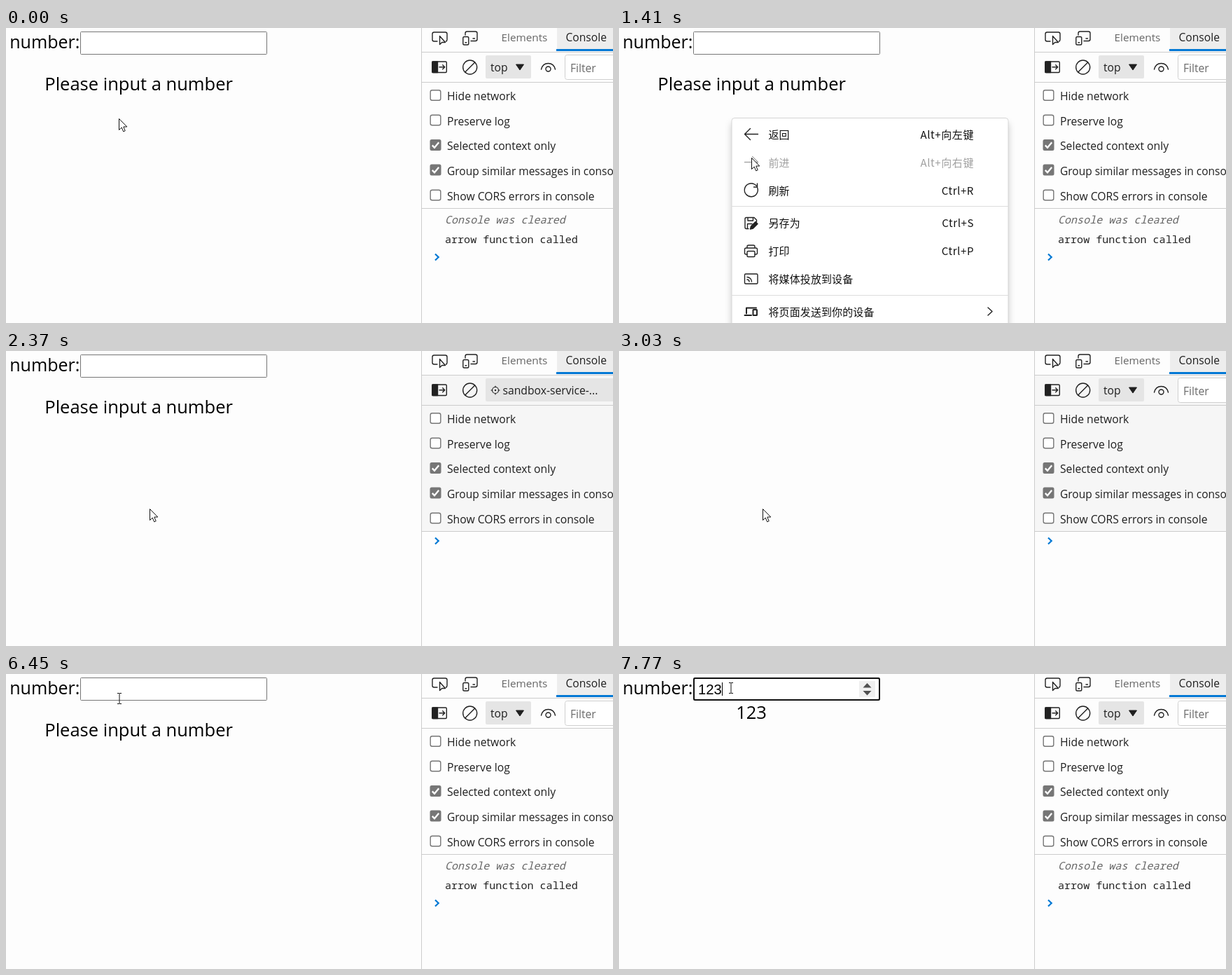
An HTML page that plays this animation: 867x421 px, repeating every 8 s.

```html
<!DOCTYPE html>
<html lang="zh-CN">
<head>
<meta charset="utf-8">
<title>Number input demo</title>
<style>
html, body { margin: 0; width: 100%; height: 100%; overflow: hidden; background: #fdfdfd; }
svg { display: block; width: 867px; height: 421px; }
text { font-family: "Open Sans", "Noto Sans", sans-serif; white-space: pre; }
.page text { font-size: 25.5px; fill: #000; }
.tools text { font-size: 15.7px; fill: #1f1f1f; }
.tools .log { font: 15.07px "Noto Sans Mono", "DejaVu Sans Mono", monospace; fill: #222; }
.tools .note { font-style: italic; fill: #666; }
.page .typed { font: 20.2px "Liberation Sans", Arial, sans-serif; }
.menu text { font: 15px "Noto Sans CJK SC", "Noto Sans CJK JP", sans-serif; letter-spacing: .1px; fill: #111; }
.menu .key { text-anchor: end; letter-spacing: .6px; }
.menu .off { fill: #a0a0a0; }
.mid { text-anchor: middle; }
.line { fill: none; stroke: #222; stroke-width: 1.4; stroke-linecap: round; stroke-linejoin: round; }
.box { fill: #fff; stroke: #767676; stroke-width: 1.4; }
.sheet { fill: #fff; stroke: #d6d6d6; stroke-width: 1; filter: drop-shadow(0 7px 5px rgba(0,0,0,.2)); }
.hover { fill: #ededed; }

/* every change is a hard cut on an 8 s clock */
.a { animation: 8s step-end infinite; }
.menu { animation-name: menu; }
.back { animation-name: back; }
.reload { animation-name: reload; }
.form { animation-name: form; }
.message { animation-name: message; }
.panel { animation-name: panel; }
.top { animation-name: top; }
.sandbox { animation-name: sandbox; }
.cleared { animation-name: cleared; }
.called { animation-name: called; }
.rule { animation-name: rule; }
.prompt { animation-name: prompt; }
.arrow { animation-name: arrow; }
.beam { animation-name: beam; }
.spin { animation-name: spin; }
.focus { animation-name: focus; }
.caret { animation-name: caret; }
.one { animation-name: one; }
.two { animation-name: two; }
.three { animation-name: three; }
.only1 { animation-name: only1; }
.only2 { animation-name: only2; }

@keyframes menu { 0%, 24.25%, 100% { opacity: 0 } 12.5%, 22.625% { opacity: .5 } 14% { opacity: 1 } }
@keyframes back { 0%, 17.625%, 100% { opacity: 0 } 14% { opacity: 1 } }
@keyframes reload { 0%, 24.25%, 100% { opacity: 0 } 19.125% { opacity: 1 } }
@keyframes form { 0%, 74.125%, 100% { opacity: 1 } 37.875% { opacity: 0 } }
@keyframes message { 0%, 74.125% { opacity: 1 } 37.875%, 88.875%, 100% { opacity: 0 } }
@keyframes panel { 0%, 74.125%, 100% { fill: #fdfdfd } 29.625% { fill: #f6f6f6 } }
@keyframes top { 0%, 31.125%, 100% { opacity: 1 } 29.625% { opacity: 0 } }
@keyframes sandbox { 0%, 31.125%, 100% { opacity: 0 } 29.625% { opacity: 1 } }
@keyframes cleared { 0%, 67.25%, 100% { opacity: 1 } 29.625% { opacity: 0 } }
@keyframes called { 0%, 74.125%, 100% { opacity: 1 } 29.625% { opacity: 0 } }
@keyframes rule { 0%, 74.125%, 100% { opacity: 0 } 67.25% { opacity: 1 } }
@keyframes prompt {
  0%, 74.125%, 100% { transform: translateY(327px) }
  29.625% { transform: translateY(271px) }
  67.25% { transform: translateY(299px) }
}
@keyframes arrow {
  0% { transform: translate(161px, 129px); opacity: 1 }
  14% { transform: translate(173px, 149px); opacity: 1 }
  15.875% { transform: translate(178px, 158px); opacity: 1 }
  17.625% { transform: translate(189px, 185px); opacity: 1 }
  19.125% { transform: translate(199px, 213px); opacity: 1 }
  20.75% { transform: translate(205px, 225px); opacity: 1 }
  77.375% { transform: translate(183px, 135px); opacity: 1 }
  78.875% { transform: translate(178px, 97px); opacity: 1 }
  80.625%, 100% { transform: translate(178px, 97px); opacity: 0 }
}
@keyframes beam {
  0% { transform: translate(162px, 35px); opacity: 0 }
  80.625% { transform: translate(162px, 35px); opacity: 1 }
  82.25%, 100% { transform: translate(160px, 20px); opacity: 1 }
}
@keyframes spin { 0% { opacity: 0 } 82.25%, 100% { opacity: 1 } }
@keyframes focus { 0% { opacity: 0 } 83.875%, 100% { opacity: 1 } }
@keyframes caret {
  0%, 83.875% { transform: translateX(113px) }
  88.875% { transform: translateX(125px) }
  94% { transform: translateX(136px) }
  97.125%, 100% { transform: translateX(147px) }
}
@keyframes one { 0% { opacity: 0 } 88.875%, 100% { opacity: 1 } }
@keyframes two { 0% { opacity: 0 } 94%, 100% { opacity: 1 } }
@keyframes three { 0% { opacity: 0 } 97.125%, 100% { opacity: 1 } }
@keyframes only1 { 0%, 94%, 100% { opacity: 0 } 88.875% { opacity: 1 } }
@keyframes only2 { 0%, 97.125%, 100% { opacity: 0 } 94% { opacity: 1 } }
</style>
</head>
<body>
<svg viewBox="0 0 867 421">
  <defs>
    <rect id="box" class="box" x="606.2" y="-7.3" width="14.6" height="14.6" rx="2.5"/>
    <g id="checked">
      <rect x="605.5" y="-8" width="16" height="16" rx="2.5" fill="#767676"/>
      <path d="M608.8 .4l3.2 3.4 6.2-7.6" fill="none" stroke="#fff" stroke-width="2.3"/>
    </g>
  </defs>

  <g class="page">
    <g class="a form">
      <text x="5.2" y="29" style="font-size:25px">number:</text>
      <rect x="106.5" y="5.5" width="266" height="32" rx="1" fill="#fff" stroke="#767676"/>
    </g>
    <text class="a message mid" x="189.6" y="89">Please input a number</text>
    <g class="a spin">
      <rect x="343" y="10" width="23" height="23" fill="#efefef"/>
      <path d="M348.5 19.5h12l-6-6.5zM348.5 24h12l-6 6.5z" fill="#505050"/>
    </g>
    <g class="a focus">
      <rect x="107" y="6" width="265" height="31" rx="2" fill="none" stroke="#101010" stroke-width="2"/>
      <path class="a caret" d="M.5 12v19" stroke="#000"/>
    </g>
    <text class="typed a one" x="113" y="28.5">1</text>
    <text class="typed a two" x="124.2" y="28.5">2</text>
    <text class="typed a three" x="135.5" y="28.5">3</text>
    <text class="mid a only1" x="189" y="64">1</text>
    <text class="mid a only2" x="189" y="64">12</text>
    <text class="mid a three" x="189" y="64">123</text>
  </g>

  <g class="tools">
    <rect x="787" width="80" height="31" fill="#ededed"/>
    <rect class="a panel" x="594" y="35" width="273" height="222"/>
    <path d="M593.5 0v421M594 34.5h273M594 77.5h273M594 257.5h273" stroke="#ccc"/>
    <rect x="786" y="30" width="81" height="3" fill="#0078d4"/>
    <text x="707.5" y="19" style="font-size:15.3px;fill:#666">Elements</text>
    <text x="799.5" y="19" style="font-size:15.6px">Console</text>

    <!-- inspect, device, sidebar and clear buttons -->
    <g class="line">
      <path d="M616 19h-4.5q-2.5 0-2.5-2.5v-8q0-2.5 2.5-2.5h16q2.5 0 2.5 2.5v8q0 2-1.5 2.5"/>
      <path d="M619.5 11.5v12l3.2-3h4.8z"/>
      <path d="M656 10v-2.5q0-2.5 2.5-2.5h12q2.5 0 2.5 2.5v8.5q0 2.5-2.5 2.5h-6.5M667 15h2.5"/>
      <rect x="652.8" y="12.5" width="8" height="11.5" rx="1.8"/>
      <path d="M656 20.7h1.7"/>
      <rect x="608.8" y="48" width="20.5" height="15.5" rx="1.5"/>
      <path d="M609 48h7.5v15.5h-7.5z" fill="#222"/>
      <path d="M619 55.7h7.5M623.7 52.7l3 3-3 3"/>
      <circle cx="662.7" cy="56" r="10"/>
      <path d="M655.7 63l14-14"/>
    </g>

    <g class="a top">
      <rect x="685" y="39" width="65" height="33" rx="2" fill="#e5e5e5"/>
      <text x="692" y="61.5">top</text>
      <path d="M728.5 52h11l-5.500 8z" fill="#1f1f1f" stroke="#1f1f1f" stroke-linejoin="round"/>
      <g class="line">
        <path d="M764.5 59q2-8.5 10-8.5t10 8.5"/>
        <circle cx="774.5" cy="58.5" r="3.5"/>
      </g>
      <rect x="798.5" y="38.5" width="80" height="35" rx="3" fill="#fff" stroke="#d0d0d0"/>
      <text x="806" y="62.5" style="fill:#6b6b6b">Filter</text>
    </g>
    <g class="a sandbox">
      <rect x="685" y="39" width="190" height="33" rx="2" fill="#e5e5e5"/>
      <g class="line" style="stroke-width:1.2">
        <circle cx="699" cy="56" r="4.5"/>
        <path d="M699 50v1.5M699 60.5v1.5M693 56h1.5M703.5 56h1.5"/>
      </g>
      <circle cx="699" cy="56" r="1.2" fill="#222"/>
      <text x="709.5" y="61.5">sandbox-service-...</text>
    </g>

    <use href="#box" y="96"/>
    <use href="#box" y="131.5"/>
    <use href="#checked" y="167"/>
    <use href="#checked" y="202.5"/>
    <use href="#box" y="238.5"/>
    <text x="630" y="102.5">Hide network</text>
    <text x="630" y="138.5">Preserve log</text>
    <text x="630" y="174">Selected context only</text>
    <text x="630" y="209.5" style="font-size:15.5px">Group similar messages in console</text>
    <text x="630" y="245.5">Show CORS errors in console</text>

    <text class="log note a cleared" x="627" y="279">Console was cleared</text>
    <text class="log a called" x="627" y="307">arrow function called</text>
    <path class="a rule" d="M594 285.5h273" stroke="#ececec"/>
    <path class="a prompt" d="M613 -4.5l4.7 4.5-4.7 4.5" fill="none" stroke="#0078d4" stroke-width="2.2"/>
  </g>

  <g class="a menu">
    <rect class="sheet" x="161" y="128.5" width="395" height="320" rx="4"/>
    <rect class="hover a back" x="167" y="135" width="384" height="34" rx="3"/>
    <rect class="hover a reload" x="167" y="215" width="384" height="34" rx="3"/>
    <path d="M161 254.5h395M161 381.5h395" stroke="#dcdcdc"/>
    <g class="line">
      <path d="M179.5 151.5h19M187.5 143.5l-8 8 8 8"/>
      <path d="M179.5 191.5h19M190.5 183.5l8 8-8 8" stroke="#a8a8a8"/>
      <path d="M197.5 227.5a9.5 9.5 0 1 1-4-4.5l3.5 2.5M197.5 222v5h-5"/>
      <path d="M185 286.5h-3q-2 0-2-2v-12q0-2 2-2h11l3.5 3.5v2.5M184 270.5v4.5h7.500v-4.5M183.5 286v-6.5h6.5"/>
      <path d="M187.5 287l1-4 6.5-6.5 3 3-6.5 6.5z" fill="#222"/>
      <path d="M183 314v-2q0-2 2-2h7q2 0 2 2v2M183 323h-1.5q-2 0-2-2v-5q0-2 2-2h14q2 0 2 2v5q0 2-2 2h-1.5"/>
      <rect x="183" y="318.5" width="11" height="8" rx="1.5"/>
      <rect x="179.5" y="351" width="18.5" height="14" rx="1.5"/>
      <path d="M183 355.500a6.500 6.500 0 0 1 6.500 6.500M183 359a3 3 0 0 1 3 3"/>
      <g style="stroke-width:2">
        <path d="M182 407.500v-8h14M179.5 410h9.5"/>
        <rect x="191.5" y="402" width="5.500" height="8" rx=".5"/>
      </g>
      <path d="M527 399l6 5.500-6 5.500"/>
    </g>
    <text x="213.5" y="158">返回</text><text class="key" x="507" y="158">Alt+向左键</text>
    <text class="off" x="213.5" y="198">前进</text><text class="key off" x="507" y="198">Alt+向右键</text>
    <text x="213.5" y="238">刷新</text><text class="key" x="507" y="238">Ctrl+R</text>
    <text x="213.5" y="284">另存为</text><text class="key" x="507" y="284">Ctrl+S</text>
    <text x="213.5" y="324">打印</text><text class="key" x="507" y="324">Ctrl+P</text>
    <text x="213.5" y="364">将媒体投放到设备</text>
    <text x="213.5" y="410.5">将页面发送到你的设备</text>
  </g>

  <path class="a arrow" d="M.5 .5v16l3.700-3.500 2.500 5.800 2.500-1.100-2.400-5.700h5z" fill="#fff" stroke="#111"/>
  <path class="a beam" d="M-3 -7.500h2.500l.5 .5 .5-.5h2.500M0 -7v14M-3 7.500h2.500l.5-.5 .5 .5h2.500" fill="none" stroke="#111"/>
</svg>
</body>
</html>
```
